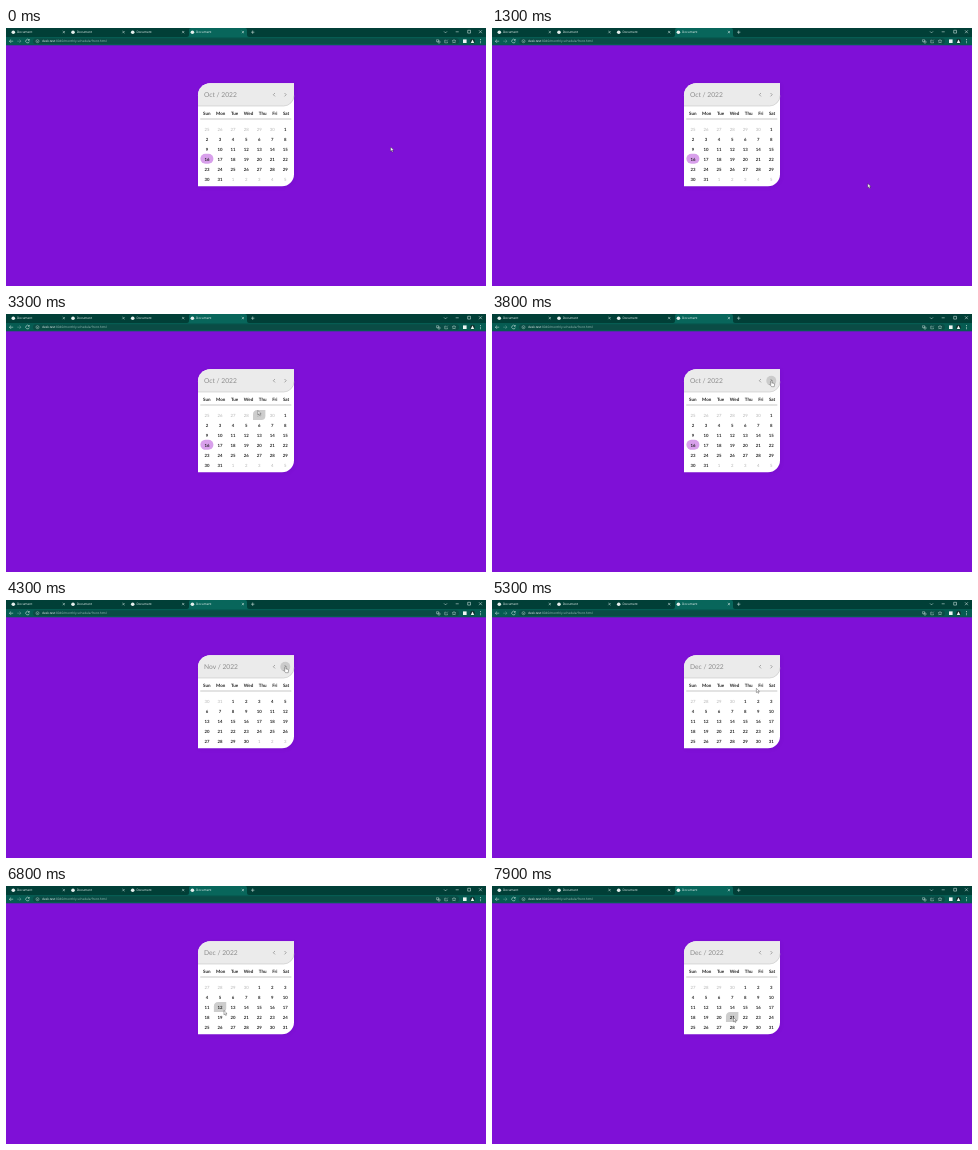
Animation, 480 px wide and 258 px high, one loop 8 s. Source, as an HTML page:

```html
<!DOCTYPE html>
<html lang="en">
<head>
<meta charset="utf-8">
<title>Calendar</title>
<style>
  html, body { margin: 0; width: 100%; height: 100%; overflow: hidden; background: #7f10d7; }
  body, text { font-family: Lato, "Open Sans", sans-serif; text-rendering: geometricPrecision; }
  svg { display: block; width: 480px; height: 258px; }
  .ui text { font-family: "Open Sans", Roboto, sans-serif; font-size: 3.15px; fill: #f0f8f6; }
  .line { fill: none; stroke: #d3e8e4; stroke-width: .55; }
  .thin { stroke-width: .4; }
  .title { font-size: 6.7px; fill: #8d8d8d; }
  .day { font-size: 4.3px; font-weight: 700; fill: #222; text-anchor: middle; }
  .dim { font-weight: 400; fill: #b5b5b5; }
  #week {
    position: absolute; left: 197px; top: 83px; width: 86.3px;
    display: flex; justify-content: space-between;
    font-size: 4.5px; font-weight: 700; line-height: 5px; color: #222;
  }
  #top { position: absolute; left: 0; top: 0; }
</style>
</head>
<body>
<svg viewBox="0 0 480 258">
  <defs>
    <filter id="soft" x="-20%" y="-20%" width="140%" height="140%">
      <feGaussianBlur stdDeviation="2"/>
    </filter>
  </defs>

  <g class="ui">
    <rect width="480" height="17.3" fill="#065c52"/>
    <rect width="480" height="9" fill="#013f37"/>
    <path d="M181 9q2 0 2-2V2q0-2 2-2h54q2 0 2 2v5q0 2 2 2z" fill="#08665b"/>
    <g id="tabs"></g>
    <path class="line" d="M245 4.2h3.4M246.7 2.5v3.4M438 3.4l1.5 1.5 1.5-1.5M449.7 3.8h3M461.7 2.3h2.8v2.8h-2.8zM473 2.3l2.9 2.9m0-2.9l-2.9 2.9"/>
    <path class="line" d="M7.2 13.2H3.4m1.7-1.7l-1.7 1.7 1.7 1.7"/>
    <path class="line" opacity=".45" d="M11.2 13.2H15m-1.7-1.7l1.7 1.7-1.7 1.7"/>
    <path class="line" d="M23 12a1.8 1.8 0 1 0 .3 1.6M23.3 11v1.3H22"/>
    <rect x="27" y="10.3" width="426" height="5.8" rx="2.9" fill="#0a4c45"/>
    <circle class="line thin" cx="31.5" cy="13.2" r="1.5"/>
    <path class="line thin" d="M31.5 13v1"/>
    <text x="36" y="14.4">desk.test<tspan fill="#9cc1ba">:8040/monthly-schedule/front.html</tspan></text>
    <path class="line thin" d="M430.5 11.7h2.1v2h-2.1zM432 13h2v2h-2zM440.2 12.2h-1.5v2.6h2.8v-1.2M440 13.5l1.8-1.8M448 11.4l.6 1.2 1.3.1-1 .9.3 1.3-1.2-.7-1.2.7.3-1.3-1-.9 1.3-.1z"/>
    <rect x="457" y="11.4" width="3.6" height="3.6" fill="#eef6f4"/>
    <circle cx="466.5" cy="13.2" r="2.4" fill="#10302d"/>
    <path d="M464.8 15l1.7-3.6 1.7 3.6z" fill="#eef6f4"/>
    <path d="M474.5 11.2v4" stroke="#e0efeb" stroke-width=".8" stroke-dasharray=".8"/>
  </g>

  <path id="shadow" fill="#26004a" opacity=".07" filter="url(#soft)" transform="translate(1 1)"/>
  <path id="card" fill="#fff"/>
  <path d="M192 78V67.3a12 12 0 0 1 12-12h84V67.5A10.5 10.5 0 0 1 277.5 78z" fill="#ebebeb"/>
  <path d="M192 78h85.5A10.5 10.5 0 0 0 288 67.5" fill="none" stroke="#b8b8b8" stroke-width=".5"/>
  <text id="title" class="title" x="198" y="68.9"></text>
  <circle id="next" cx="279.3" cy="66.7" r="5" fill="#cbcbcb"/>
  <path d="M269 65l-1.7 1.7 1.7 1.7M278.5 65l1.7 1.7-1.7 1.7" fill="none" stroke="#777" stroke-width=".6"/>
  <path d="M194.3 91h91" stroke="#8d8d8d" stroke-width=".5"/>
  <rect id="today" x="194.4" y="125.8" width="13" height="10" rx="5" fill="#d8a0eb"/>
  <path id="hover" d="M-6.2 5v-5.5q0-4.5 4.5-4.5h7.9v6q0 4-4 4z" fill="#cdcdcd"/>
  <g id="days"></g>
</svg>
<div id="week"></div>
<svg id="top" viewBox="0 0 480 258">
  <g id="cursor" fill="#fff" stroke="#222" stroke-width=".35">
    <path id="arrow" d="M0 0v4.3l1-.9.7 1.6.8-.35-.7-1.55h1.3z"/>
    <path id="hand" d="M.1.4q.6-.8 1.1 0v2l2 .5q.8.3.6 1.3l-.4 2H.8L-.9 4q0-.8 1 0z"/>
  </g>
</svg>
<script>
const $ = id => document.getElementById(id);
const LOOP = 8000, STEP = 100;
const LEFT = 201, TOP = 101, COL = 13.05, ROW = 10;
const cell = (col, row) => [LEFT + COL * col, TOP + ROW * row];
const NEXT = [278.8, 66.5];

const TAB = 59.7;
$('tabs').innerHTML = [0, 1, 2, 3].map(i => `<g transform="translate(${TAB * i})">
  <circle cx="7.3" cy="4.2" r="1.8" fill="#e6efed"/>
  <text x="11" y="5.3">Document</text>
  <path class="line" d="M56.7 3l2.2 2.2m0-2.2l-2.2 2.2"/></g>`).join('');

$('week').innerHTML = 'Sun Mon Tue Wed Thu Fri Sat'.replace(/\w+/g, '<span>$&</span>');

// Pointer moves: start time, number of steps, destination
const home = [384.6, 119];
const moves = [
  [100, 3, [384.5, 130]],
  [1300, 1, [375.8, 155.5]],
  [2300, 6, cell(4, 2.8)],
  [3100, 3, cell(3.9, -.45)],
  [3600, 3, NEXT],
  [5200, 5, cell(3.2, 2)],
  [6100, 1, cell(2.3, 2.2)],
  [6400, 2, cell(1.3, 2.35)],
  [6900, 1, cell(0, 3.2)],
  [7400, 2, cell(.3, 3.15)],
  [7800, 2, cell(3.1, 3.05)]
];

function pointer(t) {
  let [x, y] = home;
  for (const [start, count, [toX, toY]] of moves) {
    if (t < start) break;
    const part = Math.min(1, (Math.floor((t - start) / STEP) + 1) / count);
    x += (toX - x) * part;
    y += (toY - y) * part;
  }
  return [x, y];
}

const monthAt = t => t < 4300 ? 9 : t < 5200 ? 10 : 11;
let shown, rows;

function showMonth(month) {
  if (month === shown) return;
  shown = month;
  const first = new Date(2022, month, 1);
  const lead = first.getDay();
  const length = new Date(2022, month + 1, 0).getDate();
  rows = Math.ceil((lead + length) / 7);
  $('title').textContent = first.toLocaleString('en', { month: 'short' }) + ' / 2022';

  let out = '';
  for (let i = 0; i < rows * 7; i++) {
    const date = new Date(2022, month, i - lead + 1);
    const [x, y] = cell(i % 7, Math.floor(i / 7));
    const dim = date.getMonth() === month ? '' : ' dim';
    out += `<text class="day${dim}" x="${x}" y="${y + 1.5}">${date.getDate()}</text>`;
  }
  $('days').innerHTML = out;

  const low = 98.2 + ROW * rows;
  const shape = `M192 ${low}V67.3a12 12 0 0 1 12-12h84V${low - 12}a12 12 0 0 1-12 12z`;
  for (const id of ['card', 'shadow']) $(id).setAttribute('d', shape);
  toggle('today', month === 9);
}

function toggle(id, on) { $(id).style.visibility = on ? 'visible' : 'hidden'; }
function place(id, [x, y]) { $(id).setAttribute('transform', `translate(${x} ${y})`); }

function draw(t) {
  showMonth(monthAt(t));
  const [x, y] = pointer(t);
  const col = Math.round((x - LEFT) / COL);
  const row = Math.round((y - TOP) / ROW);
  const onDay = col >= 0 && col < 7 && row >= 0 && row < rows;
  const onNext = Math.hypot(x - NEXT[0], y - NEXT[1]) < 5;
  toggle('hover', onDay);
  toggle('next', onNext);
  toggle('arrow', !onNext);
  toggle('hand', onNext);
  if (onDay) place('hover', cell(col, row));
  place('cursor', [x, y]);
}

const origin = performance.now();
function tick() {
  draw((performance.now() - origin) % LOOP);
  requestAnimationFrame(tick);
}
tick();
</script>
</body>
</html>
```
